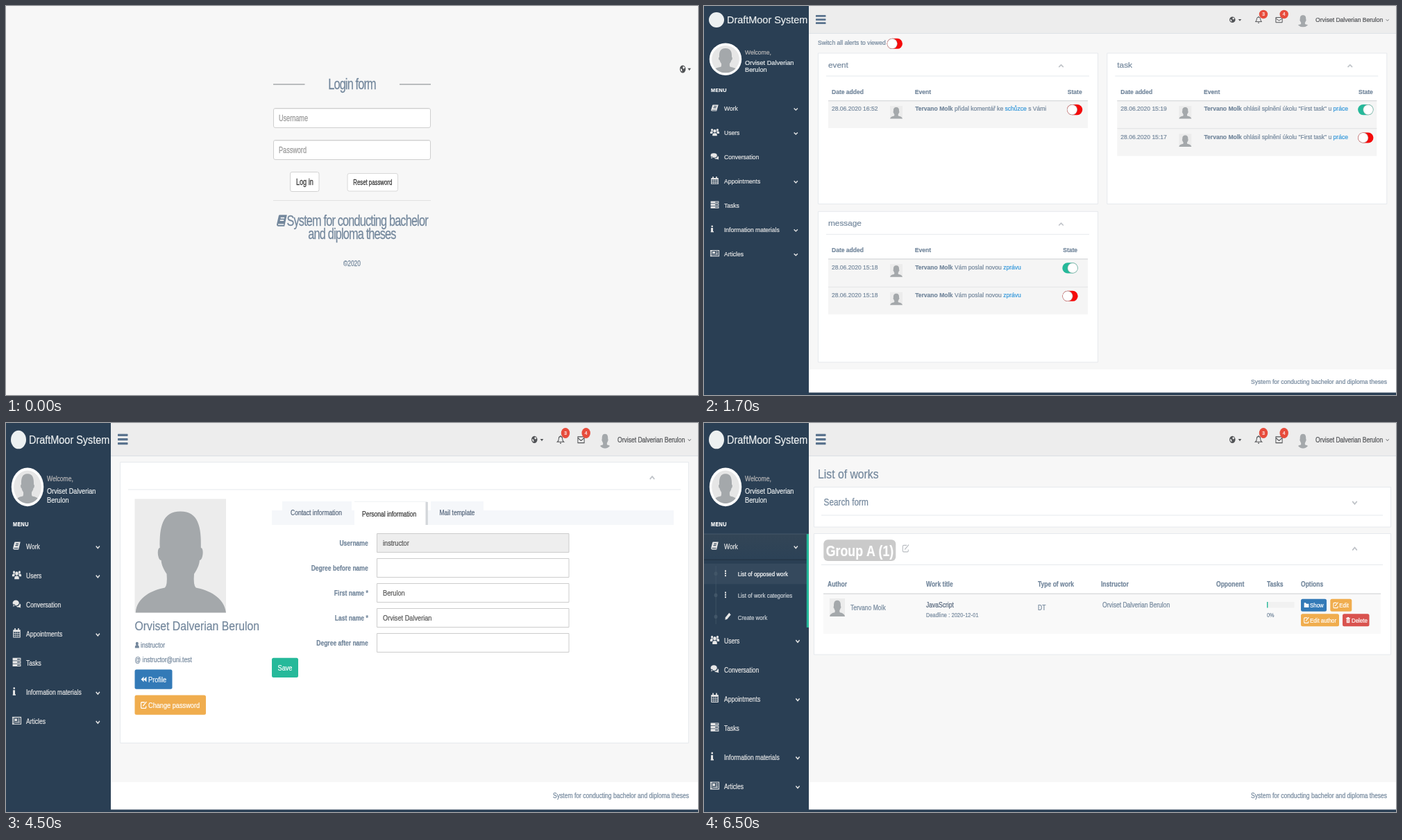
Write an HTML page with a canvas that moves like this. It is 997 px wide and 561 px high and loops after 8000 ms.

```html
<!DOCTYPE html>
<html lang="en">
<head>
<meta charset="utf-8">
<title>Thesis system tour</title>
<style>
html, body { margin: 0; width: 100%; height: 100%; overflow: hidden; background: #f7f7f7; }
canvas { display: block; }
</style>
</head>
<body>
<canvas id="stage" width="997" height="561"></canvas>
<script>
const ctx = document.getElementById('stage').getContext('2d');
const W = 997, H = 561, ZOOM = 0.6564, TALL = 1.2035;
const INK = '#73879c', DARK = '#2a3f54', LINK = '#3498db', GREEN = '#26b99a';
const BLUE = '#337ab7', ORANGE = '#f0ad4e', RED = '#d9534f', EDGE = '#e6e9ed';
const LAST = 'Orviset Dalverian', FIRST = 'Berulon', FULL = LAST + ' ' + FIRST;
const STUDENT = 'Tervano Molk', LOGIN = 'instructor', MAIL = 'instructor@uni.test';
const SLOGAN = 'System for conducting bachelor and diploma theses';

// Scale from page pixels to stage pixels, for glyphs and icons.
let gx = ZOOM, gy = ZOOM;

// Path pieces: holes wind the other way.
const box = (x, y, w, h) => `M${x} ${y}h${w}v${h}h${-w}z`;
const hole = (x, y, w, h) => `M${x} ${y}v${h}h${w}v${-h}z`;
const dot = (x, y, r) => `M${x - r} ${y}a${r} ${r} 0 1 1 ${2 * r} 0a${r} ${r} 0 1 1 ${-2 * r} 0`;
const times = (n, f) => Array.from({ length: n }, (_, i) => f(i)).join('');

const solid = {
  book: 'M-4 -7H8L4 7H-6Q-9 6 -8 4L-5 -6Z' + hole(-2, -4, 6, 1.5) + hole(-3, -1, 6, 1.5) + hole(-6, 4, 9, 1.2),
  users: dot(0, -2.5, 3.4) + dot(-6, -5, 2.4) + dot(6, -5, 2.4) +
    'M-5 8V5Q-4 1 0 2Q4 1 5 5V8Z M-10 3V0Q-9 -3 -4 -2L-5 3Z M10 3V0Q9 -3 4 -2L5 3Z',
  comments: 'M-9 -2a7 5 0 1 1 14 0a7 5 0 1 1 -14 0M-7 0L-8 5L-3 2Z M6.5 -1Q10 1 8 5L9 7L5 6Q0 6 -1 4Q6 4 6.5 -1Z',
  calendar: box(-8, -6, 16, 14) + box(-5, -9, 2.5, 4) + box(2.5, -9, 2.5, 4) +
    times(9, i => hole(-6.4 + 4.5 * (i % 3), -2.5 + 3.4 * Math.floor(i / 3), 3.6, 2.5)),
  tasks: times(3, i => box(-9, -8 + 5.5 * i, 18, 4.5) + hole(1, -6.6 + 5.5 * i, 6.5, 1.6)),
  info: dot(0, -6, 2) + box(-2.5, -2.5, 4.5, 9) + box(-3, 5, 6.5, 2),
  news: box(-10, -7, 20, 14) + hole(-6, -5.5, 14.5, 11) + box(-4.5, -4, 5, 5) +
    times(3, i => box(2, -4 + 2.4 * i, 5, 1.2)) + box(-4.5, 2.6, 11.5, 1.3) + hole(-8.7, -5, 1.2, 10),
  globe: dot(0, 0, 6.5) + 'M1 -5L0 -2L2 0L5 -3Z M-5 -1L-4 3L-1 4L-2 0Z',
  caret: 'M-3.5 -2H3.5L0 2Z',
  user: dot(0, -3, 3.4) + 'M-5 6V3Q-4 -1 0 0Q4 -1 5 3V6Z',
  dots: times(3, i => box(-1.7, -6 + 4.7 * i, 3.2, 3.2)),
  pencil: 'M-7 7L-6 2L3 -7L7 -3L-2 6Z',
  folder: 'M-6 -5H-2L0 -3H6V5H-6Z',
  trash: box(-4, -3, 8, 9) + box(-5.5, -5, 11, 1.5) + box(-2, -6.5, 4, 1.5) + hole(-2, -1.5, 1, 6) + hole(1, -1.5, 1, 6),
  back: 'M0 -5V5L-6 0Z M6 -5V5L0 0Z'
};
const lines = {
  up: 'M-5 2.5L0 -2.5L5 2.5',
  down: 'M-5 -2.5L0 2.5L5 -2.5',
  bell: 'M-7 4Q-4 2 -4 -2Q-4 -6 0 -6Q4 -6 4 -2Q4 2 7 4ZM0 -8V-6M-1.5 6.5H1.5',
  mail: 'M-7 -5H7V6H-7ZM-7 -3L0 2L7 -3',
  edit: 'M2 -5H-4Q-6 -5 -6 -3V4Q-6 6 -4 6H3Q5 6 5 4V2M-2 2L6 -6'
};

function at(x, y, draw) {
  ctx.save();
  ctx.translate(x, y);
  ctx.scale(gx, gy);
  draw();
  ctx.restore();
}

function icon(name, x, y, color, size = 1, weight = 1.8) {
  at(x, y, () => {
    ctx.scale(size, size);
    ctx.fillStyle = ctx.strokeStyle = color;
    ctx.lineWidth = weight;
    if (solid[name]) ctx.fill(new Path2D(solid[name]));
    else ctx.stroke(new Path2D(lines[name]));
  });
}

// Draws one line of slightly thickened text and returns where it ends.
function text(s, x, y, { px = 13, color = INK, bold = false, align = 'left', gap = 0 } = {}) {
  let width = 0;
  at(x, y, () => {
    ctx.font = `${bold ? 'bold ' : ''}${px}px "Liberation Sans", Arial, sans-serif`;
    ctx.letterSpacing = gap + 'px';
    ctx.textAlign = align;
    ctx.fillStyle = ctx.strokeStyle = color;
    ctx.lineWidth = .3;
    ctx.fillText(s, 0, 0);
    ctx.strokeText(s, 0, 0);
    width = ctx.measureText(s).width;
  });
  return x + width * gx;
}

function rect(x, y, w, h, color) {
  ctx.fillStyle = color;
  ctx.fillRect(x, y, w, h);
}

function round(x, y, w, h, r, fill, edge) {
  ctx.beginPath();
  ctx.roundRect(x, y, w, h, r);
  ctx.fillStyle = fill;
  ctx.fill();
  if (!edge) return;
  ctx.strokeStyle = edge;
  ctx.lineWidth = 1;
  ctx.stroke();
}

function disc(x, y, r, color) {
  ctx.beginPath();
  ctx.arc(x, y, r, 0, 7);
  ctx.fillStyle = color;
  ctx.fill();
}

const panel = (x, y, w, h) => round(x + .5, y + .5, w - 1, h - 1, 0, '#fff', EDGE);

const bust = new Path2D('M1 100C2 86 20 80 33 78Q36 76 35 66C30 60 29 56 29 54C25 54 24 43 27.5 43' +
  'C27 25 30 11 50 11C70 11 73 25 72.5 43C76 43 75 54 71 54C71 56 70 60 65 66Q64 76 67 78C80 80 98 86 100 100Z');

function avatar(x, y, w, h, back = '#ececec') {
  if (back) rect(x, y, w, h, back);
  ctx.save();
  ctx.translate(x, y);
  ctx.scale(w / 100, h / 100);
  ctx.fillStyle = '#a4a8ab';
  ctx.fill(bust);
  ctx.restore();
}

function toggle(x, y, on) {
  at(x, y, () => {
    round(-17, -11.5, 34, 23, 11.5, on ? GREEN : '#f50a0a');
    disc(on ? 5.5 : -5.5, 0, 11.5, on ? '#8fb5ac' : '#b59a9a');
    disc(on ? 5.5 : -5.5, 0, 10.5, '#fff');
  });
}

function button(x, y, w, h, color, label, glyph, px = 14) {
  round(x, y, w, h, 2.5, color);
  const small = px < 14, base = y + h / 2 + px * gy * .36;
  if (glyph) icon(glyph, x + (small ? 8 : 13), y + h / 2, '#fff', small ? .85 : 1);
  text(label, x + (glyph ? (small ? 13 : 19.5) : 8.5), base, { px, color: '#fff' });
}

function login() {
  gx = .65;
  gy = .85;
  const head = { px: 25, gap: -1.25, align: 'center' };
  rect(385, 112.5, 45.5, 1, '#7f8285');
  rect(567, 112.5, 45, 1, '#7f8285');
  text('Login form', 498.5, 119.5, head);
  [['Username', 147], ['Password', 193]].forEach(([label, y]) => {
    round(385.5, y + .5, 226, 28, 2.5, '#fff', '#cfcfcf');
    rect(387, y + 1, 223, 1, '#ececec');
    text(label, 393, y + 18.5, { px: 14, color: '#999' });
  });
  round(409.5, 239.5, 41.5, 28, 2.5, '#fff', '#d2d2d2');
  text('Log in', 418, 257.5, { px: 14, color: '#333' });
  round(492, 241.5, 72.5, 25.5, 2.5, '#fff', '#d8d8d8');
  text('Reset password', 500.3, 258, { px: 12, color: '#333' });
  rect(385, 280, 227, 1, '#e2e2e2');
  icon('book', 397.5, 309.5, INK, 1.4);
  text('System for conducting bachelor', 404.5, 317, { ...head, align: 'left' });
  text('and diploma theses', 498.5, 335.5, head);
  text('©2020', 498.5, 374.5, { align: 'center' });
  icon('globe', 975, 91, '#515356');
  icon('caret', 984.5, 91.5, '#515356');
}

function submenu() {
  const fade = ctx.createLinearGradient(0, 133, 0, 164);
  fade.addColorStop(0, '#334556');
  fade.addColorStop(1, '#2c4257');
  rect(0, 133, 151, 30.6, fade);
  rect(0, 132.6, 151, .7, '#4a5c6e');
  rect(0, 163.4, 151, .8, '#20303f');
  rect(0, 168.5, 151, 24.5, '#35495d');
  rect(16.7, 171, .8, 70, '#425668');
  rect(147.8, 133, 3.2, 112, GREEN);
  [['List of opposed work', 'dots', 31], ['List of work categories', 'dots', 31], ['Create work', 'pencil', 34.5]]
    .forEach(([label, glyph, x], i) => {
      const y = 181 + 25.8 * i;
      disc(17, y - .5, 2.4, '#425668');
      icon(glyph, x, y - 1, '#e7e7e7', .9);
      text(label, 48.7, y + 3, { px: 12, color: i ? '#c9cfd5' : '#fff' });
    });
}

function sidebar(open) {
  rect(0, 0, 151, H, DARK);
  disc(18, 20, 11, '#ecf0f1');
  text('DraftMoor System', 33, 25, { px: 22, color: '#ecf0f1' });
  disc(31, 76.7, 23.2, '#fff');
  ctx.save();
  ctx.beginPath();
  ctx.arc(31, 76.7, 19.8, 0, 7);
  ctx.clip();
  avatar(11, 56.5, 40, 40, '#e6e6e6');
  ctx.restore();
  text('Welcome,', 59, 69.6, { color: '#bab8b8' });
  text(LAST, 59, 85, { px: 14, color: '#ecf0f1' });
  text(FIRST, 59, 95.2, { px: 14, color: '#ecf0f1' });
  text('MENU', 10, 124, { px: 11, color: '#fff', bold: true, gap: .6 });
  if (open) submenu();
  [['Work', 'book', 1], ['Users', 'users', 1], ['Conversation', 'comments', 0], ['Appointments', 'calendar', 1],
    ['Tasks', 'tasks', 0], ['Information materials', 'info', 1], ['Articles', 'news', 1]]
    .forEach(([label, glyph, more], i) => {
      const shifted = open && i, y = 148 + 34.95 * i + (shifted ? 77.8 : 0);
      icon(glyph, glyph === 'info' ? 11.7 : 15.5, y - 1, '#e7e7e7');
      text(label, 29, y + 3.2, { color: '#e7e7e7' });
      if (more) icon('down', shifted ? 135 : 132.3, y + .8, '#e7e7e7', .8, 2.6);
    });
}

function topbar() {
  const gray = '#515356';
  rect(151, 0, W - 151, 39, '#ededed');
  rect(151, 39, W - 151, .8, '#d9dee4');
  for (let i = 0; i < 3; i++) round(161, 13.1 + 5.1 * i, 14.5, 2.7, .6, '#5a738e');
  icon('globe', 761.3, 19.8, gray);
  icon('caret', 772, 20.4, gray);
  icon('bell', 799, 20, gray, 1, 1.5);
  icon('mail', 828.5, 19.8, gray, 1, 1.5);
  [[806, '3'], [835.7, '4']].forEach(([x, n]) => {
    disc(x, 12, 6.2, '#e74c3c');
    text(n, x, 14.3, { px: 10, color: '#fff', align: 'center' });
  });
  ctx.save();
  ctx.beginPath();
  ctx.arc(863, 21, 9.5, 0, 7);
  ctx.clip();
  avatar(853.5, 11, 19, 19.5, null);
  ctx.restore();
  text(FULL, 881, 23, { color: gray });
  icon('down', 984.7, 20.4, gray, .6, 2);
}

// Sidebar, top bar and footer; leaves the scale set for the content.
function shell(k, footTop, open) {
  gx = gy = ZOOM;
  ctx.save();
  ctx.scale(1, k);
  sidebar(open);
  topbar();
  ctx.restore();
  gy = ZOOM * k;
  rect(151, footTop, W - 151, 557.5 - footTop, '#fff');
  rect(0, 557.5, W, H - 557.5, DARK);
  text(SLOGAN, 984, footTop + (k > 1 ? 23 : 20.5), { align: 'right' });
}

function alerts(x, y, title, stateX, rows) {
  panel(x, y - .5, 404, 218.5);
  text(title, x + 15, y + 21, { px: 18 });
  icon('up', x + 350.5, y + 18.5, '#bfc3c8', 1, 2.4);
  rect(x + 12, y + 32.5, 379, 1, EDGE);
  text('Date added', x + 20, y + 59, { bold: true });
  text('Event', x + 139.8, y + 59, { bold: true });
  text('State', stateX, y + 59, { bold: true });
  rows.forEach(([date, before, link, after, on], i) => {
    const top = y + 68 + 40.4 * i, base = top + 15.3;
    rect(x + 15, top, 374, 40, '#f5f5f5');
    rect(x + 15, top, 374, i ? .8 : 1.3, '#d9dbdd');
    text('28.06.2020 ' + date, x + 20, base);
    avatar(x + 104, top + 8, 18, 18.5);
    let end = text(STUDENT, x + 140.2, base, { bold: true });
    end = text(` ${before} `, end, base);
    end = text(link, end, base, { color: LINK });
    text(after, end, base);
    toggle(stateX + 10.3, top + 13.6, on);
  });
}

function dashboard() {
  shell(1, 524);
  text('Switch all alerts to viewed', 164, 56);
  toggle(274.8, 54.3, false);
  const done = 'ohlásil splnění úkolu "First task" u', sent = 'Vám poslal novou';
  alerts(164, 68, 'event', 523.8, [['16:52', 'přidal komentář ke', 'schůzce', ' s Vámi', false]]);
  alerts(580.3, 68, 'task', 943, [['15:19', done, 'práce', '', true], ['15:17', done, 'práce', '', false]]);
  alerts(164, 296.3, 'message', 517.2, [['15:18', sent, 'zprávu', '', true], ['15:18', sent, 'zprávu', '', false]]);
}

function profile(height, active, colon) {
  shell(TALL, 518);
  panel(164, 56, 820, height);
  icon('up', 931, 79, '#bfc3c8', 1, 2.4);
  rect(176, 95.5, 796, 1, EDGE);
  avatar(185.5, 109.5, 131.5, 164);
  text(FULL, 185.5, 299, { px: 24 });
  icon('user', 188.8, 320.3, INK, .9);
  text(colon + LOGIN, colon ? 191.5 : 194, 324);
  text('@' + (colon || ' ') + MAIL, 185.5, 344.5);

  rect(383, 126, 579, 21, '#f5f7fa');
  [['Contact information', 398, 100, 410], ['Personal information', 502, 105, 516], ['Mail template', 612, 76, 624.5]]
    .forEach(([label, x, w, tx], i) => {
      const on = i === active;
      rect(x, 113, w, 34, on ? '#fff' : '#f5f7fa');
      if (on) {
        rect(x, 113, w, .8, '#eceff2');
        rect(x + w - 2.5, 114, 3.3, 33, '#d3d6da');
      }
      text(label, on && i ? tx - 3 : tx, on ? 135 : 133.3, { color: on ? '#333' : '#53647a' });
    });
}

function contact() {
  profile(442, 0, ': ');
  rect(383, 158.5, 579, 1, '#d9d9d9');
  rect(383, 187.3, 579, 1, '#d9d9d9');
  text('Email:', 388, 177.5);
  text(MAIL, 550, 177.5);
  text('Phone', 388, 206.3);
  button(185.5, 355.5, 72, 28.3, BLUE, 'Edit profile', 'edit');
  button(185.5, 392.5, 102.5, 28.3, ORANGE, 'Change password', 'edit');
  button(185.5, 429, 116, 28.3, ORANGE, 'Change profile image', 'edit');
}

function personal() {
  profile(406, 1, '');
  [['Username', LOGIN], ['Degree before name', ''], ['First name *', FIRST], ['Last name *', LAST], ['Degree after name', '']]
    .forEach(([label, value], i) => {
      const y = 159 + 36.1 * i;
      text(label, 521.7, y + 18, { bold: true, align: 'right' });
      round(534.5, Math.round(y) + .5, 276.5, 27, 0, i ? '#fff' : '#eee', '#ccc');
      text(value, 543, y + 18, { px: 14, color: '#555' });
    });
  button(185.5, 355.5, 54, 28.3, BLUE, 'Profile', 'back');
  button(185.5, 392.5, 102.5, 28.3, ORANGE, 'Change password', 'edit');
  button(383, 338.7, 38, 28.3, GREEN, 'Save');
}

function works() {
  shell(TALL, 518, true);
  text('List of works', 164, 80, { px: 24 });
  panel(158, 92, 832, 58.5);
  text('Search form', 172.5, 119, { px: 18 });
  icon('down', 937.5, 115, '#bfc3c8', 1, 2.4);
  rect(169, 132.5, 809, 1, EDGE);

  panel(158, 159, 832, 175.5);
  round(172.3, 168.3, 104, 30.7, 6, '#cacaca');
  text('Group A (1)', 175.8, 191.5, { px: 27, bold: true, color: '#fff' });
  icon('edit', 290.7, 180.7, '#b9bdc2', 1.1, 1.5);
  icon('up', 937.5, 181.5, '#bfc3c8', 1, 2.4);
  rect(169, 204, 809, 1, EDGE);
  [['Author', 178], ['Work title', 320], ['Type of work', 481], ['Instructor', 572], ['Opponent', 738], ['Tasks', 811], ['Options', 860]]
    .forEach(([label, x]) => text(label, x, 236, { bold: true }));
  rect(172, 246, 803, 58, '#f9f9f9');
  rect(172, 245.6, 803, 1.4, '#d9dbdd');
  avatar(181, 253, 22, 26);
  text(STUDENT, 211, 270);
  text('JavaScript', 320, 265.5, { color: '#53647a' });
  text('Deadline : 2020-12-01', 320, 280.3, { px: 11, gap: .3 });
  text('DT', 481, 269.7);
  text(FULL, 574, 265.5);
  rect(811, 258, 39.5, 8.5, '#f1f1f1');
  rect(811, 258, 1.4, 8.5, GREEN);
  text('0%', 811, 280.3, { px: 11 });
  button(860, 253.7, 37, 18, BLUE, 'Show', 'folder', 12);
  button(902.3, 253.7, 31, 18, ORANGE, 'Edit', 'edit', 12);
  button(860, 275.3, 55, 18, ORANGE, 'Edit author', 'edit', 12);
  button(920, 275.3, 38.5, 18, RED, 'Delete', 'trash', 12);
}

const LOOP = 8000;
const scenes = [[0, login], [500, dashboard], [2500, contact], [4500, personal], [6500, works]];
let shown = null;

function tick() {
  const t = performance.now() % LOOP;
  const draw = scenes.findLast(([start]) => t >= start)[1];
  if (draw !== shown) {
    shown = draw;
    rect(0, 0, W, H, '#f7f7f7');
    draw();
  }
  requestAnimationFrame(tick);
}
tick();
</script>
</body>
</html>
```
